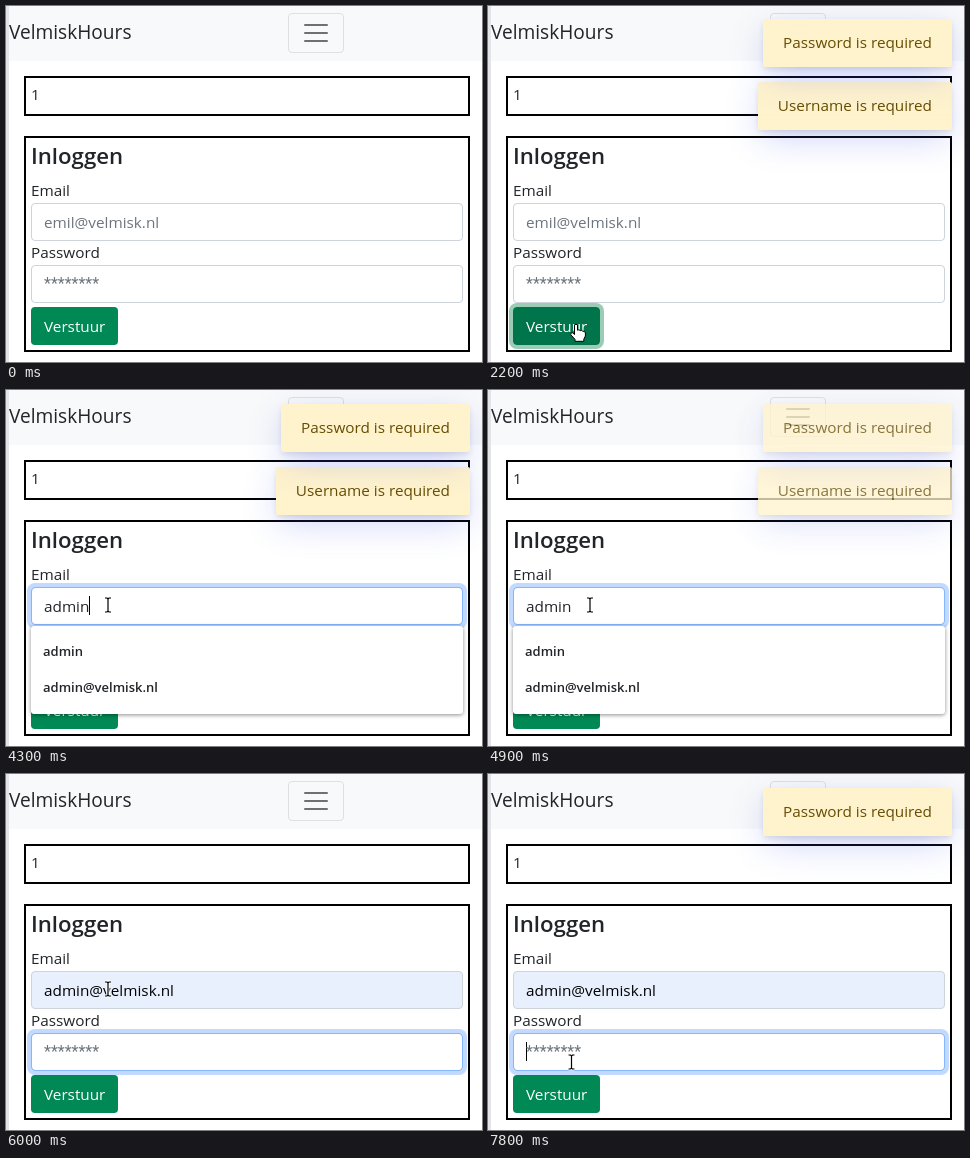
An HTML page that plays this animation: 476 by 356 pixels, repeating every 8 s.

```html
<!DOCTYPE html>
<html lang="nl">
<head>
<meta charset="utf-8">
<title>Inloggen</title>
<style>
  * { box-sizing: border-box; }
  html, body { margin: 0; width: 100%; height: 100%; overflow: hidden; background: #fff; }
  #stage {
    position: absolute; left: 0; top: 0; width: 476px; height: 356px; overflow: hidden;
    font: 15.3px/24px "Open Sans", "Noto Sans", sans-serif; color: #212529; white-space: nowrap;
  }
  #stage div, svg { position: absolute; }
  .nav { inset: 0 0 auto; height: 55px; background: #f8f9fa; }
  .edge { left: 0; top: 0; width: 3px; height: 356px; background: #e3e4e8; }
  .brand { left: 3px; top: 14px; font-size: 19.1px; }
  .toggler { left: 282px; top: 7px; width: 56px; height: 40px; border: 1px solid rgba(0,0,0,.1); border-radius: 4px; }
  .panel { left: 18px; width: 446px; border: 2px solid #000; }
  .label { left: 25px; }
  .title { left: 25px; top: 138px; font-size: 22.2px; font-weight: 600; }

  .field, #send { left: 25px; height: 38px; padding: 0 12px 1px; display: flex; align-items: center; border-radius: 4px; }
  .field { width: 432px; border: 1px solid #ced4da; background: #fff; }
  .field.filled { background: #e8f0fe; color: #000; }
  .preview { font: 13.33px "Liberation Sans", Arial, sans-serif; }
  .caret { width: 1px; height: 19px; margin-right: -1px; background: #000; }
  .hint { color: #6c757d; }
  .stars { font: 16px Roboto, sans-serif; }
  #send { top: 301px; width: 87px; padding-left: 13px; background: #008955; color: #fff; }
  #send.hover { background: #00744a; }
  .field::after, #send::after { content: ""; position: absolute; inset: -1px; border-radius: 4px; opacity: var(--focus, 0); }
  .field::after { border: 1px solid #86b7fe; box-shadow: 0 0 0 4px rgba(13,110,253,.25); }
  #send::after { inset: 0; box-shadow: 0 0 0 4px rgba(60,153,110,.5); }

  #list { left: 25px; top: 236px; width: 432px; padding: 8px 0; background: #fff; border-radius: 3px;
    box-shadow: 0 1px 4px rgba(0,0,0,.45); font-size: 13px; font-weight: 600; }
  #list p { margin: 0; height: 36px; padding-left: 12px; line-height: 34px; }
  #list p.on { background: #c8c8c8; }

  .toast { right: 12px; height: 48px; padding: 12px 20px; line-height: 23px; border-radius: 2px;
    background: #fff3cd; color: #664d03;
    box-shadow: 0 3px 6px -1px rgba(0,0,0,.12), 0 10px 36px -4px rgba(77,96,232,.3); }
  #cursor { left: 0; top: 0; overflow: visible; }
</style>
</head>
<body>
<div id="stage">
  <div class="nav"></div>
  <div class="edge"></div>
  <div class="brand">VelmiskHours</div>
  <div class="toggler">
    <svg width="54" height="38" stroke="rgba(0,0,0,.55)" stroke-width="2" stroke-linecap="round">
      <path d="M16 11H38M16 19H38M16 27H38"/>
    </svg>
  </div>
  <div class="panel" style="top:70px;height:40px"></div>
  <div class="label" style="top:76px">1</div>
  <div class="panel" style="top:130px;height:216px"></div>
  <div class="title">Inloggen</div>
  <div class="label" style="top:172px">Email</div>
  <div class="field" id="email" style="top:197px"><span id="typed"></span><i class="caret"></i><span class="hint">emil@velmisk.nl</span></div>
  <div class="label" style="top:234px">Password</div>
  <div class="field" id="pass" style="top:259px"><i class="caret"></i><span class="hint stars">********</span></div>
  <div id="send">Verstuur</div>
  <div id="list"><p>admin</p><p>admin@velmisk.nl</p><p>emil@velmisk.nl</p></div>
  <div class="toast" id="toastUser">Username is required</div>
  <div class="toast" id="toastPass">Password is required</div>
  <svg id="cursor" width="1" height="1">
    <path id="arrow" d="M0 0V15.5L3.7 12L6.2 17.6L8.8 16.5L6.3 11H11.3Z" fill="#000" stroke="#fff"/>
    <path id="hand" d="M-1.5 1.2Q0 -.8 1.5 1.2V6.2Q3 5.2 4.2 6.6Q6 5.8 6.8 7.3Q9 6.7 9.4 9V12L7.8 15.2V17.3H-1V15.4L-5.3 10.6Q-5.6 8.4 -3.4 8.8L-1.5 10.5Z" fill="#fff" stroke="#000"/>
    <g id="beam" fill="none">
      <path d="M-3 -7H-1L0 -6L1 -7H3M0 -6V6M-3 7H-1L0 6L1 7H3" stroke="#fff" stroke-width="3"/>
      <path d="M-3 -7H-1L0 -6L1 -7H3M0 -6V6M-3 7H-1L0 6L1 7H3" stroke="#000" stroke-width="1.2"/>
    </g>
  </svg>
</div>
<script>
const $ = id => document.getElementById(id);
const clamp = v => Math.max(0, Math.min(1, v));
const easeOut = v => 1 - (1 - clamp(v)) ** 3;
const within = (t, ...spans) => spans.some(([a, b]) => t >= a && t < b);
const show = (el, on) => { el.style.display = on ? "" : "none"; };

const LOOP = 8000, STEP = 100, FADE = 150;
const ADDRESS = "admin@velmisk.nl";

// time, x, y of the pointer's hot spot
const PATH = [
  [500, 410, 344], [900, 278, 343], [1300, 128, 333], [1400, 108, 328], [1600, 92, 320],
  [1800, 88, 318], [2200, 88, 318], [2900, 102, 215], [6100, 102, 215], [6600, 88, 327],
  [7000, 88, 327], [7500, 83.5, 288], [LOOP, 83.5, 288]
];
const FOCUS = {
  email: [[2950, 5450]],
  pass: [[5450, 6650], [7600, 9000]],
  send: [[1750, 2950], [6650, 7600]]
};

function pointerAt(t) {
  const i = PATH.findIndex(k => k[0] > t);
  const [t0, x0, y0] = PATH[i - 1], [t1, x1, y1] = PATH[i];
  const p = (t - t0) / (t1 - t0);
  return [x0 + (x1 - x0) * p, y0 + (y1 - y0) * p];
}

function drawPointer(t) {
  show($("cursor"), t >= 500);
  let kind = "arrow";
  if (t >= 500) {
    const [x, y] = pointerAt(t);
    if (x > 25 && x < 112 && y > 301 && y < 339) kind = "hand";
    else if (x > 25 && x < 457 && (y > 197 && y < 235 || y > 259 && y < 297)) kind = "beam";
    $("cursor").style.transform = `translate(${x}px,${y}px)`;
  }
  for (const k of ["arrow", "hand", "beam"]) show($(k), k === kind);
  $("send").classList.toggle("hover", kind === "hand");
}

function drawToast(el, t, start, rest) {
  const p = easeOut((t - start) / 400);
  el.style.top = -150 + (rest + 150) * p + "px";
  el.style.opacity = p * (1 - easeOut((t - start - 3000) / 400));
}

function typedAt(t) {
  if (t >= 5100) return ADDRESS;
  const n = [3800, 3900, 4100, 4300].filter(k => t >= k).length;
  return "admin".slice(0, n < 3 ? n : n + 1);
}

function draw(t) {
  for (const id in FOCUS) {
    const f = FOCUS[id].reduce((s, [a, b]) => s + clamp((t - a) / FADE) - clamp((t - b) / FADE), 0);
    $(id).style.setProperty("--focus", f);
  }

  const text = typedAt(t);
  $("typed").textContent = text;
  $("typed").className = within(t, [5000, 5400]) ? "preview" : "";
  $("email").classList.toggle("filled", t >= 5000);
  show($("email").querySelector(".hint"), !text);
  show($("email").querySelector(".caret"), within(t, [3000, 3500], [3800, 4900]));
  show($("pass").querySelector(".caret"), within(t, [5500, 6000], [6500, 6650], [7600, LOOP]));

  const rows = $("list").children;
  show($("list"), within(t, [3100, 5400]));
  show(rows[2], t < 3900);
  rows[0].className = within(t, [5000, 5100]) ? "on" : "";
  rows[1].className = t >= 5100 ? "on" : "";

  drawToast($("toastPass"), t, t < 6000 ? 1866 : 6745, 14);
  drawToast($("toastUser"), t, 1866, 77);
  drawPointer(t);
}

const begin = performance.now();
function tick() {
  const t = (performance.now() - begin) % LOOP;
  draw(Math.floor(t / STEP) * STEP);
  requestAnimationFrame(tick);
}
tick();
</script>
</body>
</html>
```
